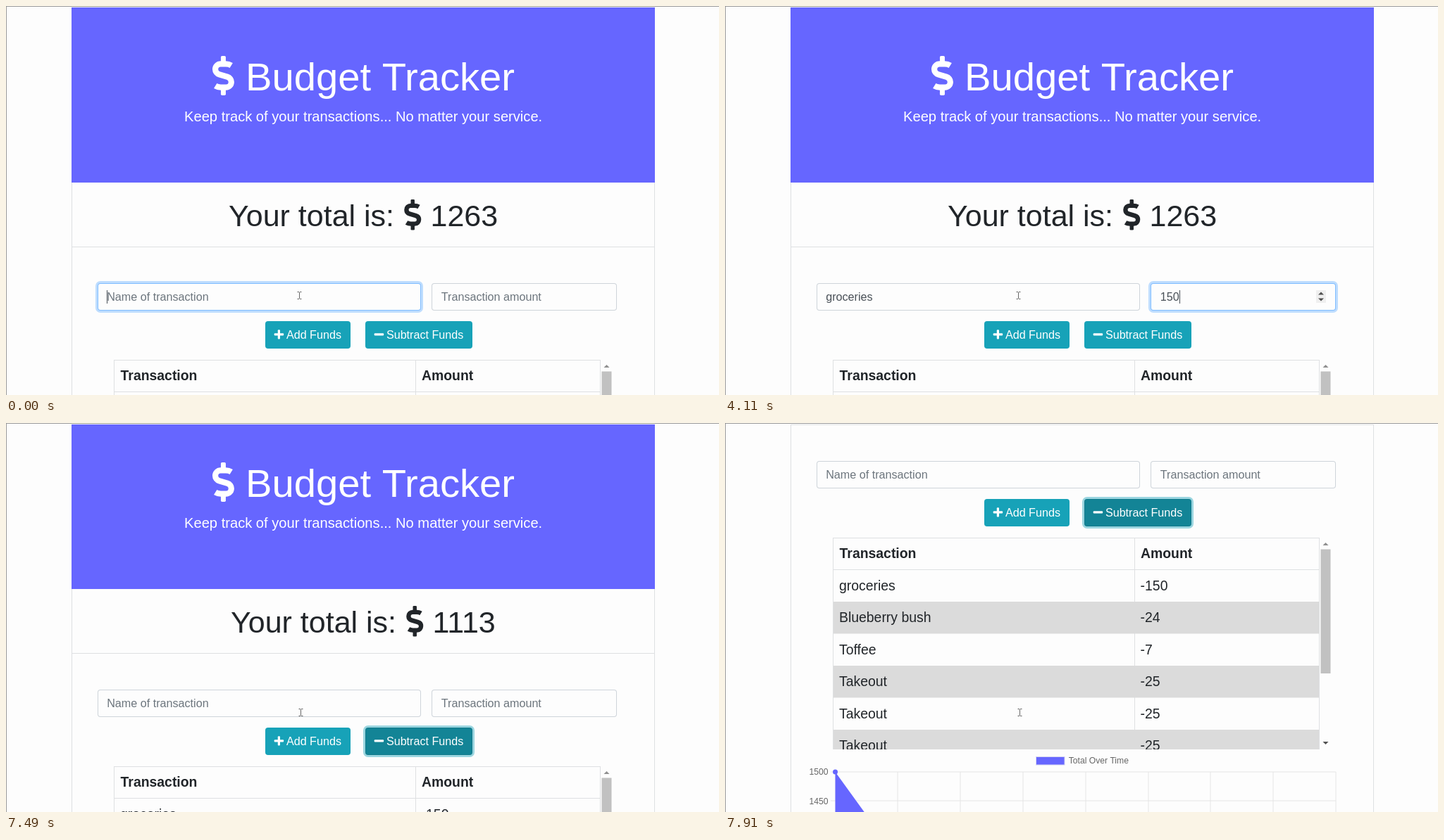
Recreate the animation shown at these times as an HTML page with a canvas. Size 1012 by 553 pixels, loop 8000 ms.

```html
<!DOCTYPE html>
<html lang="en">
<head>
<meta charset="utf-8">
<title>Budget Tracker</title>
<style>
html, body { margin: 0; width: 100%; height: 100%; overflow: hidden; background: #fdfdfd; }
canvas { display: block; }
</style>
</head>
<body>
<canvas id="stage" width="1012" height="553"></canvas>
<script>
const ctx = document.getElementById('stage').getContext('2d');
const W = 1012, H = 553, LOOP = 8000;
const FONT = '"Liberation Sans", Arial, sans-serif';
const PAPER = '#fdfdfd', INK = '#212529', LINE = '#dee0e2', VIOLET = '#6666ff';
const ROW = 45.5, TABLE_TOP = 503;

const ROWS = [['groceries', -150], ['Blueberry bush', -24], ['Toffee', -7],
  ['Takeout', -25], ['Takeout', -25], ['Takeout', -25]];

// Times of the key presses in each field
const NAME = 'groceries', NAME_KEYS = [400, 550, 840, 980, 1230, 1380, 1500, 1620, 1870];
const SUM = '150', SUM_KEYS = [3420, 3850, 4110];

// Focus strength over time: [start, value]
const FOCUS = {
  name: [[0, 1], [2410, .75], [2570, 0]],
  sum: [[0, 0], [2410, .22], [2570, 1], [4850, .7], [4970, 0]],
  add: [[0, 0], [4850, .3], [4970, 1], [5510, .8], [5670, 0]],
  sub: [[0, 0], [5510, .15], [5670, 1]]
};
const SCROLL = [[0, 0], [7490, 15], [7620, 70], [7770, 205], [7910, 340]];
const SUBMIT = 6320;

function at(steps, t) {
  let v = steps[0][1];
  for (const [start, value] of steps) if (t >= start) v = value;
  return v;
}
const typed = (text, keys, t) => text.slice(0, keys.filter(k => t >= k).length);
const mix = (a, b, p) => 'rgb(' + a.map((v, i) => Math.round(v + (b[i] - v) * p)) + ')';

function rect(x, y, w, h, color) {
  ctx.fillStyle = color;
  ctx.fillRect(x, y, w, h);
}

function round(x, y, w, h, r, color) {
  ctx.beginPath();
  ctx.roundRect(x, y, w, h, r);
  ctx.fillStyle = color;
  ctx.fill();
}

function text(str, x, y, size, color, weight = '', align = 'left') {
  ctx.font = `${weight} ${size}px ${FONT}`;
  ctx.textAlign = align;
  ctx.fillStyle = color;
  ctx.fillText(str, x, y);
}

function triangle(x, y, w, h, color) {
  ctx.beginPath();
  ctx.moveTo(x - w / 2, y);
  ctx.lineTo(x + w / 2, y);
  ctx.lineTo(x, y + h);
  ctx.fillStyle = color;
  ctx.fill();
}

const dollarCurve = new Path2D('M247 123C226 110 200 104 176 104H110C70 104 40 136 40 174' +
  'C40 205 61 232 90 240L198 272C227 280 248 307 248 338C248 377 218 408 178 408H112C88 408 62 402 41 389');

function dollar(x, y, size, color) {
  ctx.save();
  ctx.translate(x, y);
  ctx.scale(size / 512, size / 512);
  ctx.strokeStyle = color;
  ctx.lineWidth = 75;
  ctx.stroke(dollarCurve);
  round(112, 0, 64, 104, [16, 16, 0, 0], color);
  round(112, 408, 64, 104, [0, 0, 16, 16], color);
  ctx.restore();
}

// Soft ring that grows with the focus strength
function ring(x, y, w, h, p, rgb, alpha) {
  if (!p) return;
  const s = 3 * p;
  round(x - s, y - s, w + 2 * s, h + 2 * s, 4 + s, `rgba(${rgb},${alpha * p})`);
}

function field(x, w, value, hint, p, caret) {
  const y = 394, h = 39, left = Math.round(x), textX = x + 13.4;
  ring(left, y, w, h, p, '0,123,255', .25);
  round(left, y, w, h, 4, mix([206, 212, 218], [128, 189, 255], p));
  round(left + 1, y + 1, w - 2, h - 2, 3, PAPER);
  text(value || hint, textX, 418.5, 16.15, value ? '#495057' : '#6c757d');
  if (caret) {
    const end = value ? ctx.measureText(value).width : 0;
    rect(Math.round(textX + end), 404, 1, 19, '#495057');
  }
}

function spinner() {
  rect(839, 404, 14, 18, '#efefef');
  triangle(846, 410.5, 8, -4, '#505050');
  triangle(846, 415.5, 8, 4, '#505050');
}

function button(x, w, label, plus, p) {
  const y = 448, h = 39;
  ring(x, y, w, h, p, '58,176,195', .5);
  round(x, y, w, h, 4, mix([23, 162, 184], [17, 122, 139], p));
  round(x + 1, y + 1, w - 2, h - 2, 3, mix([23, 162, 184], [19, 132, 150], p));
  round(x + 12.7, 465.3, 13.4, 3.2, 1, '#fff');
  if (plus) round(x + 17.8, 460.2, 3.2, 13.4, 1, '#fff');
  text(label, x + 29.9, 472.5, 16.15, '#fff');
}

function header(total, flash) {
  rect(93, 2, 828, 249, VIOLET);
  dollar(292.7, 71, 56, '#fff');
  text('Budget Tracker', 340, 119.5, 56.2, '#fff');
  text('Keep track of your transactions... No matter your service.', 253, 163.5, 20.15, '#fff');
  if (flash) rect(143, 275, 617, 67, '#f7f7f7');
  const dx = total === '1263' ? 0 : 3;
  text('Your total is:', 316 + dx, 313, 43, INK);
  dollar(565 + dx, 275, 43.5, INK);
  text(total, 602.5 + dx, 313, 43, INK);
}

function table(done) {
  const x = 153, split = 581, right = 844, clipEnd = 804;
  ctx.save();
  ctx.beginPath();
  ctx.rect(x, TABLE_TOP, right - x, clipEnd - TABLE_TOP);
  ctx.clip();
  text('Transaction', x + 9.6, 532, 19.4, INK, 'bold');
  text('Amount', split + 9, 532, 19.4, INK, 'bold');
  rect(x, TABLE_TOP, right - x, 1, LINE);
  rect(x, 548, right - x, 1, LINE);
  rect(split, TABLE_TOP, 1, clipEnd - TABLE_TOP, LINE);
  (done ? ROWS : ROWS.slice(1)).forEach(([name, sum], i) => {
    const y = TABLE_TOP + ROW * (i + 1);
    if (i % 2) rect(x, y, right - x, ROW, '#dbdbdb');
    text(name, x + 9, y + 29.3, 19.4, INK);
    text(sum, split + 8.6, y + 29.3, 19.4, INK);
  });
  rect(x, TABLE_TOP, 1, 301, LINE);
  rect(right - 1, TABLE_TOP, 1, 301, LINE);
  ctx.restore();
  triangle(852.5, 514, 8, -4, '#8f8f8f');
  rect(845.5, 519.5, 14, 176.5, '#c1c1c1');
  triangle(852.5, 793, 8, 4, '#505050');
}

function chart() {
  const left = 156.5, top = 836, step = 88.8;
  rect(441, 814, 41.5, 12.5, '#d4d4f2');
  rect(442, 815, 39.5, 10.5, VIOLET);
  text('Total Over Time', 487.7, 823.6, 12.15, '#666');
  for (let i = 0; i < 9; i++) rect(Math.round(left + step * i) - .5, top, 1, 400, '#e5e5e5');
  for (let i = 0; i < 3; i++) {
    const y = top + 41.5 * i;
    rect(150, Math.floor(y) - .5, 717, 1, '#e5e5e5');
    text(1500 - 50 * i, 146.5, y + 4, 12.15, '#666', '', 'right');
  }
  ctx.beginPath();
  ctx.moveTo(left, top);
  ctx.lineTo(left + step, top + 123);
  ctx.lineTo(left, top + 123);
  ctx.fillStyle = VIOLET;
  ctx.fill();
  ctx.beginPath();
  ctx.arc(left, top, 3.5, 0, 7);
  ctx.fill();
}

// The pointer inverts what lies beneath it
function pointer(x) {
  ctx.save();
  ctx.globalCompositeOperation = 'difference';
  const c = '#969696';
  rect(x - .5, 407, 1, 9, c);
  for (const y of [406, 416]) {
    rect(x - 3, y, 2.5, 1, c);
    rect(x + .5, y, 2.5, 1, c);
  }
  ctx.restore();
}

function draw(t) {
  const done = t >= SUBMIT, scroll = at(SCROLL, t);
  const p = Object.fromEntries(Object.entries(FOCUS).map(([k, s]) => [k, at(s, t)]));
  rect(0, 0, W, H, PAPER);

  ctx.save();
  ctx.beginPath();
  ctx.rect(0, 2, W, H);
  ctx.clip();
  ctx.translate(0, -scroll);
  header(done ? '1113' : '1263', done && t < 7490);
  rect(93, 251, 1, 900, LINE);
  rect(920, 251, 1, 900, LINE);
  rect(93, 342, 828, 1, LINE);
  field(129.8, 459, done ? '' : typed(NAME, NAME_KEYS, t), 'Name of transaction', p.name, t < 2410);
  const blink = (t >= 2410 && t < 2990) || (t >= 3420 && t < 4690);
  field(604.4, 263, done ? '' : typed(SUM, SUM_KEYS, t), 'Transaction amount', p.sum, blink);
  if (t >= 2410 && t < 4850) spinner();
  button(368, 121, 'Add Funds', true, p.add);
  button(510, 152, 'Subtract Funds', false, p.sub);
  table(done);
  chart();
  ctx.restore();

  rect(0, 0, W, 1, '#9a9a9a');
  rect(0, 0, 1, H, '#9a9a9a');
  pointer(t < 7060 ? 416.5 : 418.5);
}

const begin = performance.now();
function frame() {
  draw((performance.now() - begin) % LOOP);
  requestAnimationFrame(frame);
}
frame();
</script>
</body>
</html>
```
